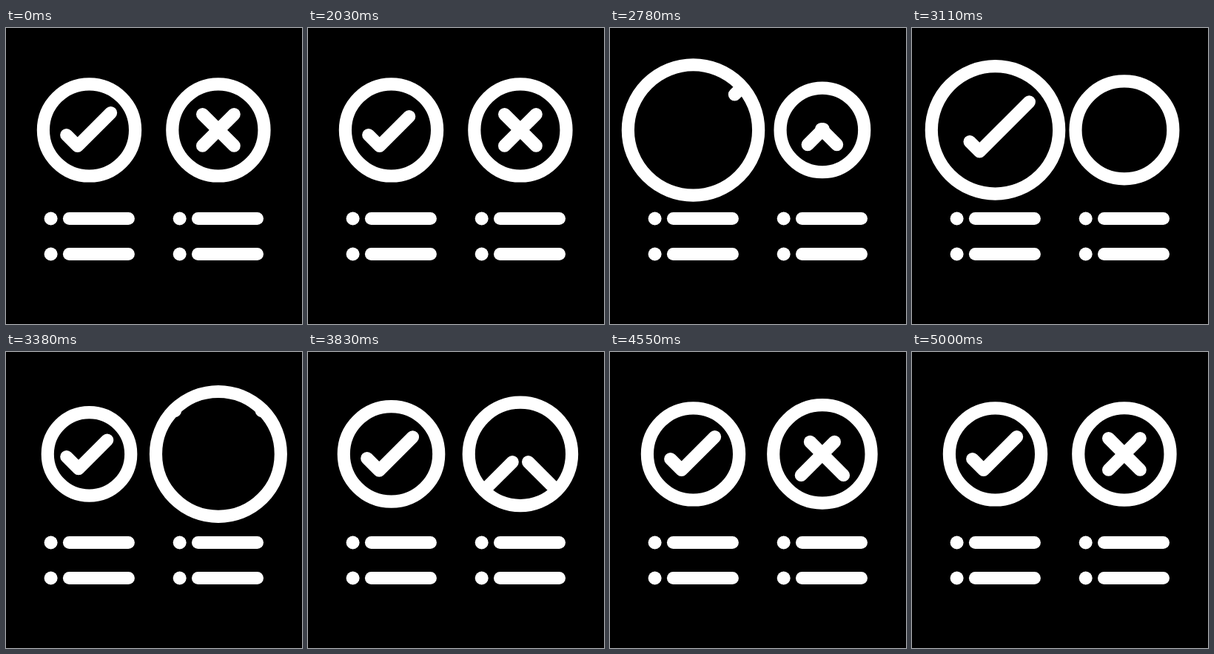
Recreate the animation shown at these times as an HTML page with a canvas. Size 400x400 px, loop 5030 ms.

```html
<!DOCTYPE html>
<html lang="en">
<head>
<meta charset="utf-8">
<title>Check and cross</title>
<style>
html, body { margin: 0; width: 100%; height: 100%; overflow: hidden; background: #000; }
canvas { display: block; width: 400px; height: 400px; }
</style>
</head>
<body>
<canvas id="stage" width="400" height="400"></canvas>
<script>
const ctx = document.getElementById('stage').getContext('2d');
const LOOP = 5030, START = 2030, STEP = 30, DELAY = 600;
const REST = 70.7, MID = 137.9;
const ERASE = 390, RETURN = 450, SETTLE = 2200;

const clamp = p => Math.min(1, Math.max(0, p));
const mix = (a, b, p) => a + (b - a) * p;
const ease = p => (1 - Math.cos(Math.PI * clamp(p))) / 2;

// Eases from one [time, value] turning point to the next.
function swing(t, points) {
  return points.slice(1).reduce((value, [time, next], i) =>
    mix(value, next, ease((t - points[i][0]) / (time - points[i][0]))), points[0][1]);
}

// The ring dips, swells, holds briefly and bounces back to rest.
const ringRadius = (t, peak) => swing(t, [[0, REST], [230, 63.5], [850, peak], [990, peak],
  [1390, 64], [1970, 75], [2400, REST]]);

// Each line is erased from its tail, then flies in along its own path.
function lineSpan(t, { head, tail, far, dip }) {
  if (t < RETURN) return [head, mix(tail, head, clamp((t + 32) / ERASE))];
  const slide = swing(t, [[RETURN, far], [1210, dip], [SETTLE, 0]]);
  return [head + slide, tail + slide];
}

// Check positions run from the short arm (negative) up the long arm.
const check = {
  x: 112.5, delay: 0, peak: 99,
  head: -21.2, tail: 63.5, far: 155, dip: -4,
  paths(head, tail) {
    const stops = head < 0 && tail > 0 ? [head, 0, tail] : [head, tail];
    return [stops.map(u => [u * Math.SQRT1_2 - 15.8, 21.6 - Math.abs(u) * Math.SQRT1_2])];
  }
};

// Cross positions run diagonally through the centre.
const cross = {
  x: 286.9, delay: DELAY, peak: 95,
  head: -21.3, tail: 21.3, far: 115, dip: -31,
  paths: (head, tail) => [-1, 1].map(side => [head, tail].map(v => [side * v, -v]))
};

function stroke(points) {
  ctx.beginPath();
  points.forEach(([x, y]) => ctx.lineTo(x, y));
  ctx.stroke();
}

function circle(x, y, r) {
  ctx.beginPath();
  ctx.arc(x, y, r, 0, Math.PI * 2);
}

function drawBadge(badge, time) {
  const t = time - badge.delay;
  const radius = ringRadius(t, badge.peak);
  const scale = radius / REST;
  const [head, tail] = lineSpan(t, badge);
  ctx.lineWidth = 17.2;
  circle(badge.x, MID, radius - ctx.lineWidth / 2);
  ctx.stroke();
  if (tail - head < 0.5) return;
  ctx.save();
  ctx.clip();
  for (const path of badge.paths(head, tail)) {
    stroke(path.map(([x, y]) => [badge.x + x * scale, MID + y * scale]));
  }
  ctx.restore();
}

function drawList(x) {
  ctx.lineWidth = 17;
  for (const y of [257.5, 305.5]) {
    circle(x, y, 9);
    ctx.fill();
    stroke([[x + 24.8, y], [x + 104.8, y]]);
  }
}

function draw(t) {
  ctx.fillStyle = '#000';
  ctx.fillRect(0, 0, 400, 400);
  ctx.fillStyle = ctx.strokeStyle = '#fff';
  ctx.lineCap = ctx.lineJoin = 'round';
  drawBadge(check, t);
  drawBadge(cross, t);
  drawList(60.6);
  drawList(234.7);
}

const origin = performance.now();
function tick() {
  const t = (performance.now() - origin) % LOOP;
  // A long pause, then motion in even steps.
  draw(t < START ? -DELAY : Math.floor((t - START) / STEP) * STEP);
  requestAnimationFrame(tick);
}
tick();
</script>
</body>
</html>
```
